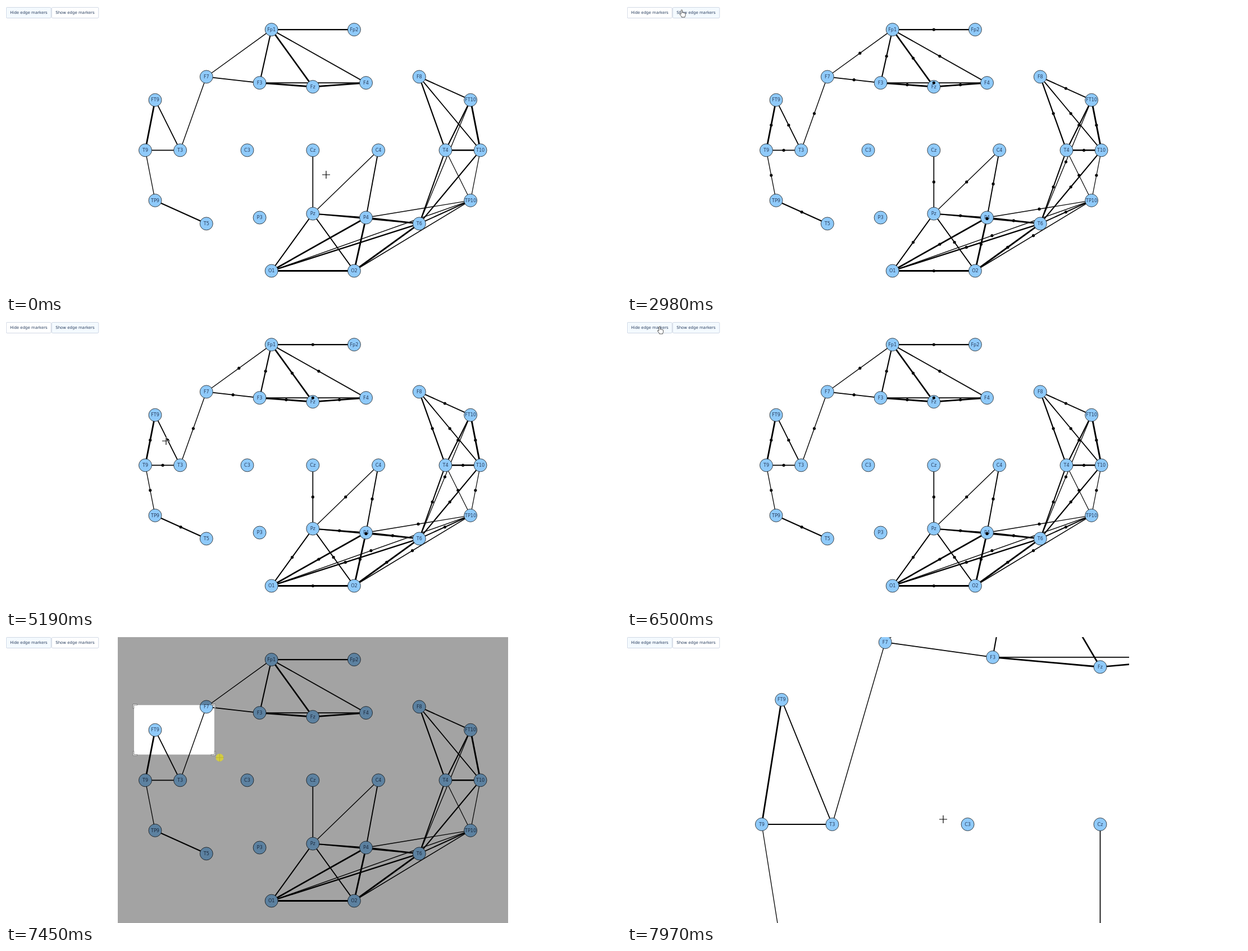
Animation of 1095 by 512 pixels, one loop 8000 ms. Source, as an HTML page:

```html
<!DOCTYPE html>
<html lang="en">
<head>
<meta charset="utf-8">
<title>Electrode graph</title>
<style>
  html, body { margin: 0; width: 100%; height: 100%; overflow: hidden; background: #fff; }
  svg { display: block; width: 100%; height: 100%; isolation: isolate; }
  text { font-family: "DejaVu Sans", sans-serif; fill: #2a3f5f; }
  .button rect { stroke: #bec8d9; stroke-width: .7; }
  .button text { font-size: 7px; }
  .edge { stroke: #000; }
  .node { fill: #8fcafa; stroke: #1a1a1a; stroke-width: .8; }
  .label { font-size: 8.1px; text-anchor: middle; }
  .tip path { fill: #000; stroke: #fff; stroke-width: .6; }
  .tip text { font: 7.6px "Liberation Sans", sans-serif; fill: #fff; }
  #cross { stroke: #fff; stroke-width: 1.2; fill: none; mix-blend-mode: difference; }
  #hand, #arrow { fill: #fff; stroke: #111; stroke-width: .7; stroke-linejoin: round; }
  #corners { fill: #fff; stroke: #444; stroke-width: .6; }
</style>
</head>
<body>
<svg id="stage" viewBox="0 0 1095 512">
  <clipPath id="plot"><rect x="199" y="2" width="695" height="510"/></clipPath>
  <rect width="1095" height="512" fill="#fff"/>
  <g class="button">
    <rect id="hideButton" x=".4" y="2.5" width="79.8" height="19" rx="1.8"/>
    <text x="7.2" y="14.4">Hide edge markers</text>
  </g>
  <g class="button">
    <rect id="showButton" x="81.4" y="2.5" width="83.4" height="19" rx="1.8"/>
    <text x="88.2" y="14.4">Show edge markers</text>
  </g>
  <g id="overview" clip-path="url(#plot)"></g>
  <g id="closeup" clip-path="url(#plot)"></g>
  <g id="dots"></g>
  <g id="tips"></g>
  <g id="zoom">
    <path id="dim" fill-rule="evenodd"/>
    <path id="corners"/>
  </g>
  <path id="cross" d="M-7 0H7M0-7V7"/>
  <path id="hand" d="M-1.3 7.6V1.1a1.2 1.2 0 0 1 2.4 0V5q1.2-.7 2 .2 1.2-.5 1.8.4 1.5-.3 1.6 1.2V9.4q0 1.6-1 2.6V13H-.4V12L-3.4 8.2q-.7-1.3.5-1.6Z"/>
  <path id="arrow" d="M0 0V9.6L2.2 7.6 3.7 11 5.2 10.4 3.8 7.1H6.9Z"/>
  <circle id="press" r="7" fill="#e6dc1e" opacity=".72"/>
</svg>
<script>
const $ = id => document.getElementById(id);
const CENTER = { x: 546.3, y: 257.3 };

// Left and right electrode names with their offset from the centre.
const PAIRS = [
  ['Fp1', 'Fp2', 73.6, -215.2], ['F7', 'F8', 189.5, -131], ['F3', 'F4', 94.7, -120.2],
  ['FT9', 'FT10', 280.8, -89.6], ['T9', 'T10', 298.3, 0], ['T3', 'T4', 236.2, 0],
  ['C3', 'C4', 116.8, 0], ['TP9', 'TP10', 280.8, 89.6], ['T5', 'T6', 189.5, 131],
  ['P3', 'P4', 94.7, 120.2], ['O1', 'O2', 73.6, 215.2]
];
const nodes = { Fz: [0, -113.2], Cz: [0, 0], Pz: [0, 113.2] };
for (const [left, right, dx, dy] of PAIRS) {
  nodes[left] = [-dx, dy];
  nodes[right] = [dx, dy];
}

// Each edge: from, to, line width.
const EDGES = `Fp1 Fp2 2.4,Fp1 F7 1.4,Fp1 F3 2.1,Fp1 Fz 2.7,Fp1 F4 1.8,F7 F3 1.8,F7 T3 1.4,
F3 Fz 2.8,F3 F4 1.6,Fz F4 2.7,FT9 T9 2.8,FT9 T3 1.8,T9 T3 1.8,T9 TP9 1.3,TP9 T5 2.2,
F8 FT10 1.9,F8 T4 2.2,F8 T10 1.8,FT10 T4 2.1,FT10 T10 2.9,FT10 T6 1.3,T4 T10 2.5,
T4 T6 2,T4 TP10 1.2,T10 TP10 1.2,T10 T6 2.1,TP10 T6 2,TP10 P4 1.3,TP10 O1 1.4,
TP10 O2 1.6,T6 O1 2.3,T6 O2 2.9,T6 P4 2.5,Pz P4 2.2,Pz T6 1.7,P4 O1 2.6,P4 O2 2.9,
P4 C4 1.9,Pz C4 1.4,Pz Cz 1.7,Pz O1 2.1,Pz O2 2,O1 O2 2.9`
  .split(',').map(edge => edge.trim().split(' '));

function add(parent, tag, attrs, content = '') {
  const el = document.createElementNS('http://www.w3.org/2000/svg', tag);
  for (const key in attrs) el.setAttribute(key, attrs[key]);
  el.textContent = content;
  return parent.appendChild(el);
}

function drawGraph(group, project) {
  for (const [from, to, width] of EDGES) {
    const [x1, y1] = project(nodes[from]), [x2, y2] = project(nodes[to]);
    add(group, 'line', { class: 'edge', x1, y1, x2, y2, 'stroke-width': width });
  }
  for (const name in nodes) {
    const [x, y] = project(nodes[name]);
    add(group, 'circle', { class: 'node', cx: x, cy: y, r: 11.5 });
    add(group, 'text', { class: 'label', x, y: y + 2.6 }, name);
  }
}

const overview = ([x, y]) => [CENTER.x + x, CENTER.y + y];
const closeup = ([x, y]) => [842.5 + x * 2.02, 336 + y * 2.48];
drawGraph($('overview'), overview);
drawGraph($('closeup'), closeup);

function middle(from, to) {
  const [x1, y1] = overview(nodes[from]), [x2, y2] = overview(nodes[to]);
  return [(x1 + x2) / 2, (y1 + y2) / 2];
}
for (const [from, to] of EDGES) {
  const [cx, cy] = middle(from, to);
  add($('dots'), 'circle', { cx, cy, r: 2.6 });
}

function makeTip(from, to, label) {
  const [x, y] = middle(from, to);
  const tip = add($('tips'), 'g', { class: 'tip', transform: `translate(${x + 2.5} ${y})` });
  add(tip, 'path', { d: 'M0 0L3.5-3.5V-6.7H47V6.7H3.5V3.5Z' });
  add(tip, 'text', { x: 5.2, y: 2.7 }, label);
  return tip;
}
const firstTip = makeTip('F7', 'T3', 'weight: 0.56');
const secondTip = makeTip('FT9', 'T3', 'weight: 0.71');

// Pointer path: time, x, y.
const PATH = [
  [0, 570, 301], [250, 570, 301], [420, 546, 305], [680, 588, 314], [1370, 588, 314],
  [2030, 405, 129], [2450, 405, 129], [2850, 97.5, 7], [3030, 97.5, 7], [3210, 301, 122],
  [3260, 301, 122], [3690, 336, 192], [3960, 336, 192], [4150, 334, 191], [4670, 334, 191],
  [5190, 285, 214], [5460, 285, 214], [5560, 287, 213], [6020, 287, 213], [6400, 58, 10],
  [6600, 58, 10], [6780, 96, 36], [6830, 96, 36], [7150, 228, 123.3], [7250, 228, 123.3],
  [7400, 320, 182], [7590, 545, 312], [7640, 545, 312], [7690, 572, 329],
  [7870, 572, 329], [7970, 563, 327], [8000, 563, 327]
];
const DRAG = { start: 7250, end: 7880, x: 228, y: 123.3, lag: 8 };

function pointerAt(t) {
  const i = PATH.findIndex(key => key[0] > t);
  const [t0, x0, y0] = PATH[i - 1], [t1, x1, y1] = PATH[i];
  const u = (t - t0) / (t1 - t0);
  const k = t < DRAG.start ? u * u * (3 - 2 * u) : u;
  return [x0 + (x1 - x0) * k, y0 + (y1 - y0) * k];
}

const within = (t, from, to) => t >= from && t < to;
const show = (el, on) => el.setAttribute('visibility', on ? 'visible' : 'hidden');

function corner(x, y, sx, sy, arm) {
  const w = 1.8, end = arm + w;
  return `M${x - 2 * sx} ${y + arm * sy}h${w * sx}v${-arm * sy}h${arm * sx}v${-w * sy}h${-end * sx}v${end * sy}Z`;
}

function drawZoomBox(t) {
  const { x, y } = DRAG;
  const [right, bottom] = pointerAt(t - DRAG.lag);
  const alpha = .4 * Math.min(1, Math.max(0, (t - 7270) / 200));
  const arm = Math.max(0, Math.min(5.8, (right - x) / 2, (bottom - y) / 2));
  $('dim').setAttribute('d', `M199 2H894V512H199ZM${x} ${y}H${right}V${bottom}H${x}Z`);
  $('dim').setAttribute('fill-opacity', alpha);
  $('corners').setAttribute('d', corner(x, y, 1, 1, arm) + corner(right, y, -1, 1, arm)
    + corner(x, bottom, 1, -1, arm) + corner(right, bottom, -1, -1, arm));
}

function render(t) {
  const [x, y] = pointerAt(t);
  const marked = within(t, 2930, 6570);
  const zoomed = t >= DRAG.end;
  const dragging = within(t, DRAG.start, DRAG.end);
  const overButton = y > 2 && y < 22 && x < 165;
  const overHide = overButton && x < 81, overShow = overButton && x >= 81;
  const kind = overButton ? 'hand' : x > 199 ? 'cross' : 'arrow';

  $('hideButton').setAttribute('fill', !marked || overHide ? '#f4faff' : '#fff');
  $('showButton').setAttribute('fill', marked || overShow ? '#f4faff' : '#fff');
  show($('overview'), !zoomed);
  show($('closeup'), zoomed);
  show($('dots'), marked);
  show(firstTip, within(t, 4010, 4720));
  show(secondTip, within(t, 5510, 6070));
  show($('zoom'), dragging);
  if (dragging) drawZoomBox(t);

  for (const id of ['cross', 'hand', 'arrow', 'press']) {
    show($(id), id === kind || (id === 'press' && within(t, 7200, 7760)));
    $(id).setAttribute('transform', `translate(${x} ${y})`);
  }
}

const begin = performance.now();
function tick() {
  render((performance.now() - begin) % 8000);
  requestAnimationFrame(tick);
}
tick();
</script>
</body>
</html>
```
